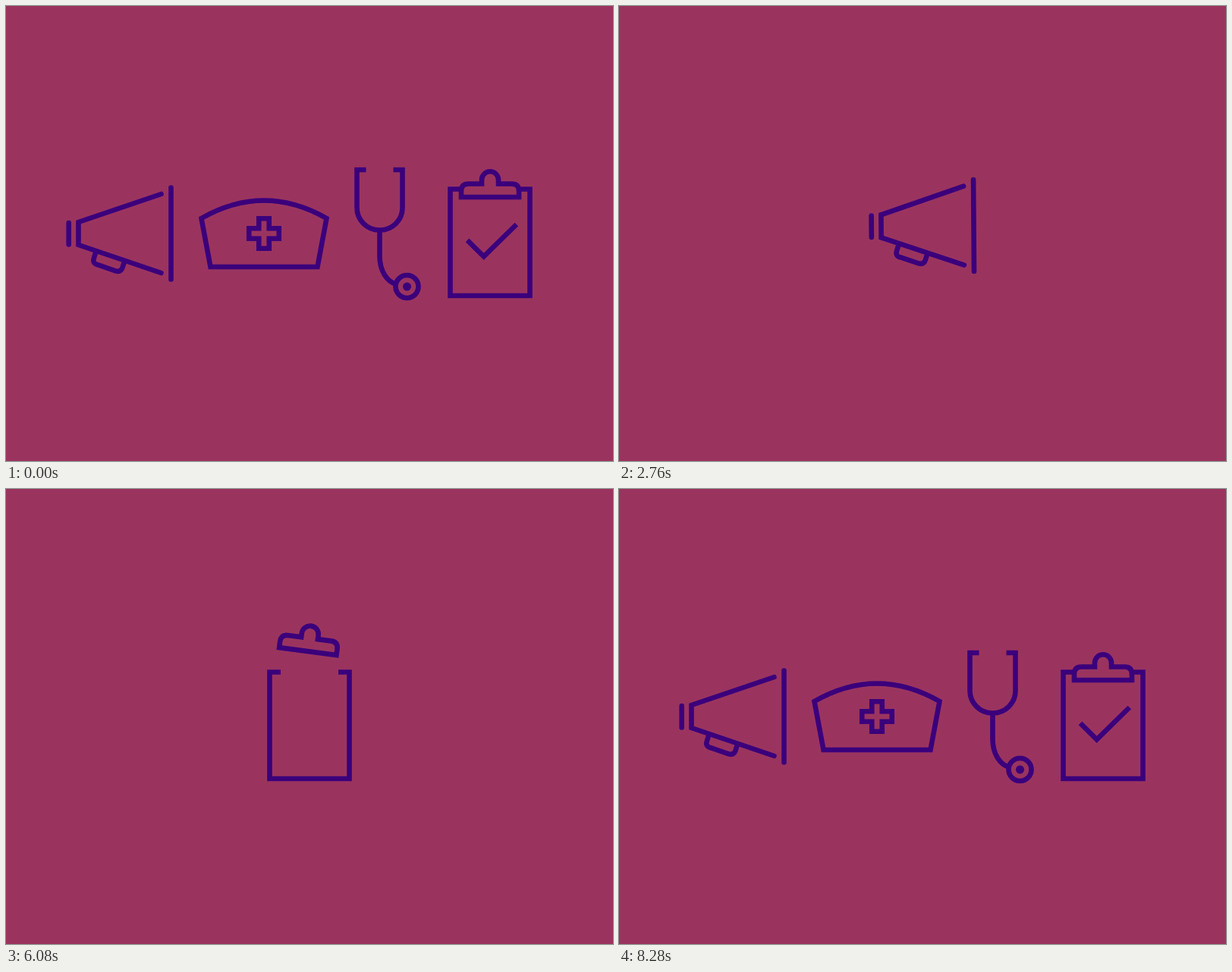
These frames come from a looping animation (800 by 600 pixels, 9.16 s). An HTML page with a canvas:

```html
<!DOCTYPE html>
<html lang="en">
<head>
<meta charset="utf-8">
<title>Nursing icons</title>
<style>
  html, body { margin: 0; width: 100%; height: 100%; overflow: hidden; background: #9a345f; }
  canvas { display: block; }
</style>
</head>
<body>
<canvas id="stage" width="800" height="600"></canvas>
<script>
const ctx = document.getElementById('stage').getContext('2d');
const LOOP = 9160, INK = '#3b007b', PAPER = '#9a345f';

// Horizontal distance of each icon from the stage centre in the row
const ROW = { mega: -250, hat: -60, steth: 102, board: 238 };

// Shared outline, mirrored about cx: hook end, top corner, bottom corner, radius, cx
const HAT = [400, 256.5, 317.5, 280, 329.5, 344, 0, 400];
const BOWL = [370, 268.3, 360.2, 268.3, 365, 356, 35, 400];
const STETH = [372.5, 216, 360.5, 216, 360.5, 295.5, 29.5, 390.5];
const BOARD = [362, 241.5, 347.5, 241.5, 347.5, 382, 0, 400];
const OUTLINES = [[4080, HAT], [4640, BOWL], [4960, STETH], [5540, STETH], [5940, BOARD]];

const CONE = [[454.5, 248], [345.5, 285], [345.5, 315], [454.5, 352]];
const RIM = [[467.5, 239.5], [467.5, 300], [467.5, 360.5]];
const CONE_HAT = [[317.5, 280], [329.5, 344], [470.5, 344], [482.5, 280]];
const RIM_HAT = [[317.5, 280], [400, 233], [482.5, 280]];

const TUBE = new Path2D('M390.5 295.5V330C390.5 349 400 364 413 367');
const HANDLE = new Path2D('M368.5 324L366 332Q363.5 339 370 341L395 349.5Q401.5 351 403.5 345L406 337');
const CLIP = new Path2D('M362 252V244Q362 234.5 371.5 234.5H389V229.3A11 11 0 0 1 411 229.3V234.5H428.5Q438 234.5 438 244V252Z');

const mix = (a, b, p) => a + (b - a) * p;

// Smooth curve through time/value pairs, flat at peaks and ends
function key(t, ...k) {
  const n = k.length / 2, T = i => k[2 * i], V = i => k[2 * i + 1];
  if (t <= T(0)) return V(0);
  if (t >= T(n - 1)) return V(n - 1);
  let i = 0;
  while (t >= T(i + 1)) i++;
  const slope = j => j < 0 || j >= n - 1 ? 0 : (V(j + 1) - V(j)) / (T(j + 1) - T(j));
  const tangent = j => {
    const a = slope(j - 1), b = slope(j);
    return a * b <= 0 ? 0 : 2 * a * b / (a + b);
  };
  const h = T(i + 1) - T(i), u = (t - T(i)) / h, w = 1 - u;
  return V(i) * (1 + 2 * u) * w * w + tangent(i) * h * u * w * w
    + V(i + 1) * u * u * (3 - 2 * u) - tangent(i + 1) * h * u * u * w;
}

// Draw in a frame that is moved, turned and scaled about a pivot
function place(draw, { x = 0, y = 0, turn = 0, scale = 1, px = 400, py = 300 }) {
  if (scale <= 0.01) return;
  ctx.save();
  ctx.translate(px + x, py + y);
  ctx.rotate(turn * Math.PI / 180);
  ctx.scale(scale, scale);
  ctx.translate(-px, -py);
  draw();
  ctx.restore();
}

function line(points) {
  ctx.beginPath();
  points.forEach(p => ctx.lineTo(...p));
  ctx.stroke();
}

function circle(x, y, r, paint) {
  ctx.beginPath();
  ctx.arc(x, y, r, 0, 7);
  ctx[paint]();
}

function outline([hx, hy, tx, ty, kx, ky, r, cx]) {
  const m = x => 2 * cx - x, mid = (hx + tx) / 2;
  ctx.beginPath();
  ctx.moveTo(hx, hy);
  ctx.quadraticCurveTo(mid, hy, tx, ty);
  ctx.arcTo(kx, ky, cx, ky, r);
  ctx.lineTo(cx, ky);
  ctx.arcTo(m(kx), ky, m(tx), ty, r);
  ctx.lineTo(m(tx), ty);
  ctx.quadraticCurveTo(m(mid), hy, m(hx), hy);
  ctx.stroke();
}

function mega(p = 0) {
  const a = -Math.PI / 2 * p, c = Math.cos(a), s = Math.sin(a);
  const morph = (from, to) => from.map(([x, y], i) => [
    mix(400 + (x - 400) * c - (y - 300) * s, to[i][0], p),
    mix(300 + (x - 400) * s + (y - 300) * c, to[i][1], p)
  ]);
  ctx.lineCap = 'round';
  line(morph(CONE, CONE_HAT));
  const [start, bend, end] = morph(RIM, RIM_HAT);
  ctx.beginPath();
  ctx.moveTo(...start);
  ctx.quadraticCurveTo(...bend, ...end);
  ctx.stroke();
  place(() => {
    line([[332.7, 286], [332.7, 314.5]]);
    ctx.lineCap = 'butt';
    ctx.stroke(HANDLE);
  }, { turn: -90 * p, scale: 1 - p });
}

function cross(wide = 19.75, tall = 19.75, y = 300) {
  const a = 6.75, b = Math.min(a, tall);
  ctx.beginPath();
  [[-a, -tall], [a, -tall], [a, -b], [wide, -b], [wide, b], [a, b],
   [a, tall], [-a, tall], [-a, b], [-wide, b], [-wide, -b], [-a, -b]]
    .forEach(([dx, dy]) => ctx.lineTo(400 + dx, y + dy));
  ctx.closePath();
  ctx.stroke();
}

function tube(grow = 1, bell = 1) {
  if (grow > 0) {
    ctx.setLineDash([grow * 90, 200]);
    ctx.stroke(TUBE);
    ctx.setLineDash([]);
  }
  place(() => {
    circle(426.5, 370, 15, 'stroke');
    circle(426.5, 370, 5.5, 'fill');
  }, { scale: bell, px: 426.5, py: 370 });
}

function check(p = 1) {
  if (p <= 0) return;
  ctx.setLineDash([p * 92, 200]);
  line([[370, 308.8], [391.7, 330.3], [434.8, 288]]);
  ctx.setLineDash([]);
}

function hat() { outline(HAT); cross(); }
function steth() { outline(STETH); tube(); }
function board() { outline(BOARD); ctx.stroke(CLIP); check(); }

function intro(t) {
  const p = key(t, 1440, 0, 1800, 0.688, 2100, 1), exit = 666 * p;
  place(mega, {
    x: ROW.mega * (1 - p),
    y: key(t, 1440, 0, 1800, 3.5, 1880, 4, 2240, -6, 2700, -10, 2760, -10, 2900, 0),
    turn: key(t, 1440, 0, 1800, 23.2, 1930, 34, 2240, -20, 2760, -0.5, 2880, 12)
  });
  place(hat, { x: ROW.hat + exit });
  place(steth, { x: ROW.steth + exit });
  place(board, { x: ROW.board + exit });
}

function megaToHat(t) {
  const p = key(t, 2880, 0, 3160, 1);
  place(() => {
    if (p < 1) mega(p); else outline(HAT);
    place(cross, { scale: key(t, 3040, 0, 3200, 1.1, 3300, 1) });
  }, { turn: key(t, 2880, 12, 3120, -5, 3320, 6.5, 3560, -2, 3760, 0.7, 3920, 0) });
}

function hatToBoard(t) {
  const shape = HAT.map((_, i) => key(t, ...OUTLINES.flatMap(([at, o]) => [at, o[i]])));
  place(() => {
    outline(shape);
    if (t < 4760) cross(
      key(t, 4080, 19.75, 4480, 6.75),
      key(t, 4200, 19.75, 4640, 4.2, 4720, 0),
      key(t, 4200, 300, 4640, 351.8, 4720, 356)
    );
    if (t > 4640 && t < 5700) place(() => tube(
      key(t, 4640, 0, 4940, 1, 5460, 1, 5640, 0),
      key(t, 4820, 0, 4960, 1, 5440, 1, 5560, 0)
    ), { x: shape[7] - 390.5, y: shape[5] - 295.5 });
  }, { y: key(t, 4900, 0, 4990, 2, 5120, 0) });
  place(() => ctx.stroke(CLIP), {
    y: key(t, 5680, 40, 5920, -58, 6080, -38, 6240, 3, 6380, -4, 6520, 0),
    turn: key(t, 5680, -20, 5940, 10, 6080, 7.5, 6260, -2, 6400, 1, 6520, 0),
    scale: key(t, 5680, 0, 5880, 1),
    py: 235
  });
  check(key(t, 6440, 0, 6860, 1));
}

function outro(t) {
  const enter = key(t, 7600, -666, 7860, -330, 8160, 4, 8280, 0);
  place(mega, { x: ROW.mega + enter });
  place(hat, { x: ROW.hat + enter });
  place(steth, { x: ROW.steth + enter });
  place(board, {
    x: key(t, 7560, 0, 7600, -4.5, 7640, -7, 7880, 120, 8160, 240, 8280, ROW.board),
    turn: key(t, 7560, 0, 7600, 2, 7800, 12, 8080, -4, 8280, 0),
    py: 311.5
  });
}

function frame(now) {
  const t = now % LOOP;
  ctx.fillStyle = PAPER;
  ctx.fillRect(0, 0, 800, 600);
  ctx.strokeStyle = ctx.fillStyle = INK;
  ctx.lineWidth = 6.6;
  ctx.lineCap = 'butt';
  const scene = t < 2880 ? intro : t < 4080 ? megaToHat : t < 7560 ? hatToBoard : outro;
  scene(t);
  requestAnimationFrame(frame);
}
requestAnimationFrame(frame);
</script>
</body>
</html>
```
